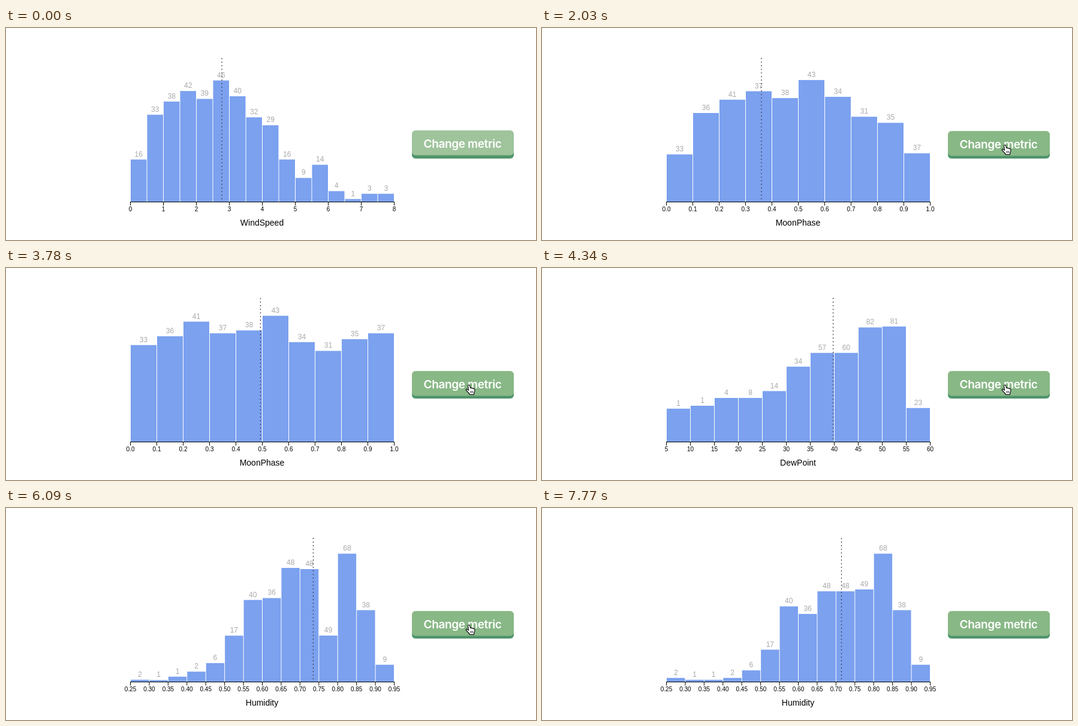
These frames come from a looping animation (884x354 px, 8.4 s). An HTML page with a canvas:

```html
<!DOCTYPE html>
<html lang="en">
<head>
<meta charset="utf-8">
<title>Change metric</title>
<style>
html, body { margin: 0; width: 100%; height: 100%; overflow: hidden; background: #fff; }
canvas { display: block; }
</style>
</head>
<body>
<canvas id="stage" width="884" height="354"></canvas>
<script>
const ctx = document.getElementById('stage').getContext('2d');
const LOOP = 8400, DURATION = 1000;
const LEFT = 207.5, WIDTH = 440, BASE = 290, HEIGHT = 220;
const SANS = '"Liberation Sans", Arial, sans-serif';

// start: time of the click; domain: top of the count scale; mean: position along the axis
const metrics = [
  { name: 'WindSpeed', start: -DURATION, from: 0, step: 1, ticks: 8, digits: 0, domain: 50, mean: 0.3466,
    counts: [16, 33, 38, 42, 39, 46, 40, 32, 29, 16, 9, 14, 4, 1, 3, 3] },
  { name: 'MoonPhase', start: 1974, from: 0, step: 0.1, ticks: 10, digits: 1, domain: 45, mean: 0.493,
    counts: [33, 36, 41, 37, 38, 43, 34, 31, 35, 37] },
  { name: 'DewPoint', start: 3856, from: 5, step: 5, ticks: 11, digits: 0, domain: 90, mean: 0.701,
    counts: [1, 1, 4, 8, 14, 34, 57, 60, 82, 81, 23] },
  { name: 'Humidity', start: 5957, from: 0.25, step: 0.05, ticks: 14, digits: 2, domain: 70, mean: 0.6636,
    counts: [2, 1, 1, 2, 6, 17, 40, 36, 48, 48, 49, 68, 38, 9] },
];

const clamp = v => Math.min(1, Math.max(0, v));
const mix = (a, b, p) => a + (b - a) * p;
const smooth = p => p * p * (3 - 2 * p);

// cubic-bezier(0, 0, .58, 1)
function easeOut(x) {
  if (x >= 1) return 1;
  let low = 0, high = 1;
  for (let i = 0; i < 24; i++) {
    const s = (low + high) / 2;
    if (1.74 * (1 - s) * s * s + s ** 3 < x) low = s; else high = s;
  }
  return 3 * low * low - 2 * low ** 3;
}

function text(string, x, y, font, color) {
  ctx.font = font;
  ctx.fillStyle = color;
  ctx.fillText(string, x, y);
}

function drawChart(t) {
  const index = metrics.findLastIndex(m => t >= m.start);
  const metric = metrics[index], previous = metrics[index - 1] || metric;
  const p = easeOut(clamp((t - metric.start) / DURATION));
  const barHeight = (m, i) => m.counts[i] / m.domain * HEIGHT;
  const barWidth = WIDTH / metric.counts.length;

  metric.counts.forEach((count, i) => {
    const target = barHeight(metric, i);
    const h = i < previous.counts.length ? mix(barHeight(previous, i), target, p) : target;
    const x = LEFT + i * barWidth;
    ctx.fillStyle = '#7ba1ef';
    ctx.fillRect(x + 0.5, BASE - h, barWidth - 1, h);
    text(count, x + barWidth / 2, BASE - h - 5, `12px ${SANS}`, '#a9a9a9');
  });

  const meanX = LEFT + WIDTH * mix(previous.mean, metric.mean, p);
  ctx.strokeStyle = '#453840';
  ctx.lineWidth = 1.2;
  ctx.setLineDash([2, 4]);
  ctx.beginPath();
  ctx.moveTo(meanX, 50);
  ctx.lineTo(meanX, BASE);
  ctx.stroke();
  ctx.setLineDash([]);

  ctx.strokeStyle = '#000';
  ctx.lineWidth = 1;
  ctx.beginPath();
  ctx.moveTo(LEFT - 0.5, BASE + 0.5);
  ctx.lineTo(LEFT + WIDTH + 0.5, BASE + 0.5);
  for (let i = 0; i <= metric.ticks; i++) {
    const x = LEFT + i * WIDTH / metric.ticks;
    ctx.moveTo(x, BASE);
    ctx.lineTo(x, BASE + 6.5);
    text((metric.from + i * metric.step).toFixed(metric.digits), x, BASE + 16, `10px ${SANS}`, '#000');
  }
  ctx.stroke();
  text(metric.name, LEFT + WIDTH / 2 - 0.5, 330, `14px ${SANS}`, '#000');
}

function roundBox(x, y, w, h, r, color) {
  ctx.fillStyle = color;
  ctx.beginPath();
  ctx.roundRect(x, y, w, h, r);
  ctx.fill();
}

function drawButton(t) {
  const glow = 1 - clamp(t / 210);
  const face = [[136, 159], [184, 196], [134, 156]].map(([a, b]) => mix(a, b, glow));
  const y = 172 - glow;
  roundBox(677, y + 5, 170, 41 + glow, 6, '#50956b');
  roundBox(677, y, 170, 41.5, 6, `rgb(${face})`);
  ctx.letterSpacing = '-0.38px';
  text('Change metric', 761.5, y + 29, '600 19px Inter, sans-serif', '#fff');
  ctx.letterSpacing = '0px';
}

const arrow = new Path2D('M0 0V15L3.5 11.8L6 17.5L8.6 16.4L6.2 10.8H11Z');
const hand = new Path2D('M-1.6 1Q-1.4 -1 .4 -.6Q1.5 -.3 1.8 1.2L2.6 4.6Q4.2 3.4 5.2 5Q6.8 4 7.7 5.6' +
  'Q9.4 5 9.8 7.2Q10.2 10 8.8 12.4L8.4 15.4H1.6Q.4 13 -2 10.8L-4.6 8Q-5.2 6.2 -3.4 6.2L-.4 8.2Z');
const creases = new Path2D('M2.8 9.2V12.8M4.8 9.2V12.8M6.8 9.2V12.8');

function drawCursor(t) {
  if (t < 560 || t >= 7770) return;
  const enter = smooth(clamp((t - 490) / 420));
  const leave = smooth(clamp((t - 7210) / 560));
  const x = mix(mix(742, 772, enter), 822, leave);
  const y = mix(mix(268, 196, enter), 360, leave);
  const overButton = x > 677 && x < 847 && y > 172 && y < 218;
  ctx.save();
  ctx.translate(x, y);
  ctx.lineJoin = 'round';
  ctx.lineWidth = 1.2;
  ctx.fillStyle = overButton ? '#fff' : '#000';
  ctx.strokeStyle = overButton ? '#111' : '#fff';
  const shape = overButton ? hand : arrow;
  ctx.fill(shape);
  ctx.stroke(shape);
  if (overButton) {
    ctx.lineWidth = 0.8;
    ctx.stroke(creases);
  }
  ctx.restore();
}

function render() {
  const t = performance.now() % LOOP;
  ctx.fillStyle = '#fff';
  ctx.fillRect(0, 0, 884, 354);
  ctx.textAlign = 'center';
  drawChart(t);
  drawButton(t);
  drawCursor(t);
  requestAnimationFrame(render);
}
render();
</script>
</body>
</html>
```
